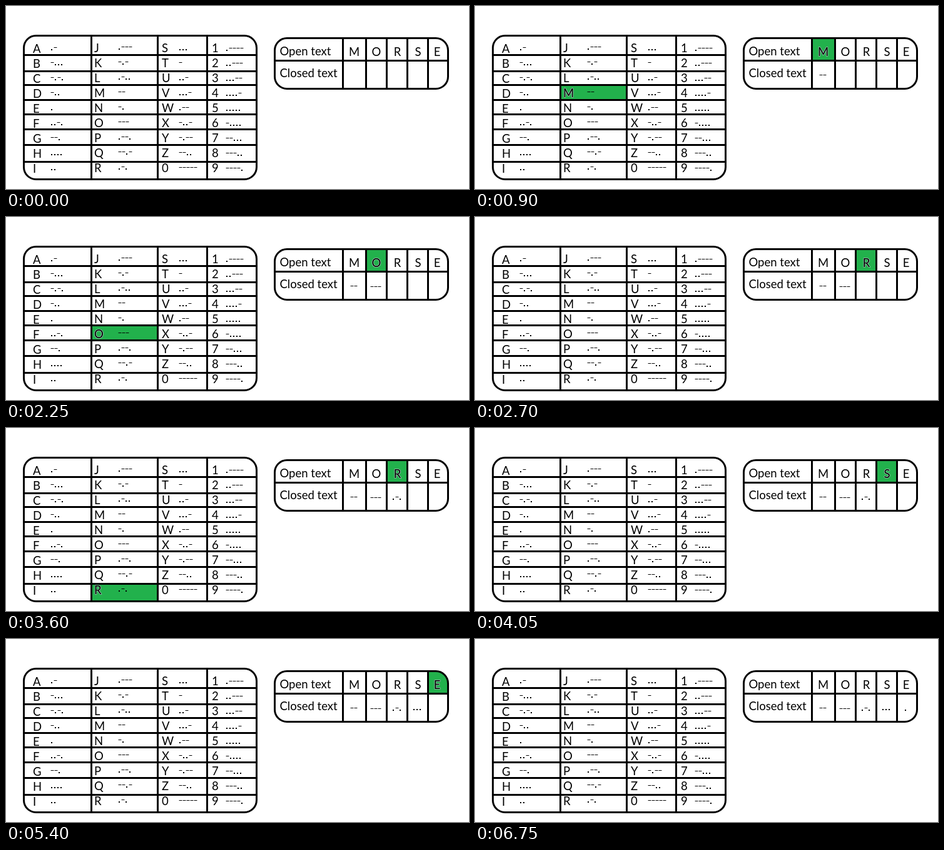
An HTML page with a canvas for the animation above (8100 ms loop, 740 px wide and 293 px high).

```html
<!DOCTYPE html>
<html lang="en">
<head>
<meta charset="utf-8">
<title>Morse encoding</title>
<style>
  html, body { margin: 0; width: 100%; height: 100%; overflow: hidden; background: #fff; }
  canvas { display: block; }
</style>
</head>
<body>
<canvas id="stage" width="740" height="293"></canvas>
<script>
const ctx = document.getElementById('stage').getContext('2d');
const STEP = 450, LOOP = 8100, GREEN = '#22b14c';

const COLUMNS = [
  { chars: 'ABCDEFGHI', x: 43, y: 75, codeX: 71, codeY: 71,
    codes: '.- -... -.-. -.. . ..-. --. .... ..' },
  { chars: 'JKLMNOPQR', x: 141, y: 74, codeX: 179, codeY: 70,
    codes: '.--- -.- .-.. -- -. --- .--. --.- .-.' },
  { chars: 'STUVWXYZ0', x: 249, y: 74, codeX: 276, codeY: 71,
    codes: '... - ..- ...- .-- -..- -.-- --.. -----' },
  { chars: '123456789', x: 329, y: 74, codeX: 351, codeY: 72,
    codes: '.---- ..--- ...-- ....- ..... -.... --... ---.. ----.' }
].map(c => ({ ...c, codes: c.codes.split(' ') }));

// Centres of the ruled lines
const COL_LINES = [28.5, 136.5, 242.5, 321.5, 400.5];
const ROW_LINES = [47.5, 78.5, 104.5, 126.5, 150.5, 173.5, 197.5, 222.5, 249.5, 277.5];
const WORD_LINES = [538.5, 575.5, 608.5, 641.5, 674.5, 706.5];
const WORD_ROWS = [51.5, 87.5, 132.5];
const WORD_LEFT = 429.5;

const WORD = [
  { char: 'M', x: 556.5, codeX: 550, codeY: 115, col: 1, row: 3 },
  { char: 'O', x: 592, codeX: 582, codeY: 116, col: 1, row: 5 },
  { char: 'R', x: 625.5, codeX: 617, codeY: 115, col: 1, row: 8 },
  { char: 'S', x: 658.5, codeX: 650, codeY: 114, col: 2, row: 0 },
  { char: 'E', x: 689, codeX: 686, codeY: 115, col: 0, row: 4 }
];

function framePath(x0, y0, x1, y1) {
  ctx.beginPath();
  ctx.roundRect(x0, y0, x1 - x0, y1 - y0, 19.5);
}

function line(x0, y0, x1, y1) {
  ctx.beginPath();
  ctx.moveTo(x0, y0);
  ctx.lineTo(x1, y1);
  ctx.stroke();
}

function grid(xs, ys, firstX) {
  ctx.strokeStyle = '#000';
  ctx.lineWidth = 3;
  const right = xs[xs.length - 1], bottom = ys[ys.length - 1];
  framePath(firstX, ys[0], right, bottom);
  ctx.stroke();
  for (const x of xs.slice(0, -1)) if (x > firstX) line(x, ys[0], x, bottom);
  for (const y of ys.slice(1, -1)) line(firstX, y, right, y);
}

function fillCell(x0, y0, x1, y1) {
  ctx.fillStyle = GREEN;
  ctx.fillRect(x0, y0, x1 - x0, y1 - y0);
}

function label(text, x, y, align = 'left', halo = false) {
  ctx.textAlign = align;
  if (halo) {
    ctx.strokeStyle = 'rgba(220, 200, 230, 0.65)';
    ctx.lineWidth = 1.7;
    ctx.strokeText(text, x, y);
  }
  ctx.fillStyle = '#000';
  ctx.fillText(text, x, y);
}

function morse(code, x, base) {
  ctx.fillStyle = '#000';
  for (const mark of code) {
    if (mark === '.') {
      ctx.fillRect(x + 1, base - 2, 2, 2);
      x += 5;
    } else {
      ctx.fillRect(x + 0.6, base - 5, 4.8, 1);
      x += 6;
    }
  }
}

function draw(time) {
  // Each letter takes three steps: highlight, look up, write
  const tick = Math.floor((time % LOOP) / STEP);
  const index = tick < 1 || tick > 14 ? -1 : Math.floor(tick / 3);
  const active = WORD[index];
  // The first letter is looked up as soon as it is highlighted
  const found = active && tick % 3 > 0;
  const written = Math.floor((tick + 1) / 3);

  ctx.fillStyle = '#fff';
  ctx.fillRect(0, 0, 740, 293);
  ctx.font = '18.5px Lato, Carlito, sans-serif';
  ctx.lineJoin = 'round';

  if (found) {
    const { col, row } = active;
    fillCell(COL_LINES[col], ROW_LINES[row], COL_LINES[col + 1], ROW_LINES[row + 1]);
  }
  if (active) {
    ctx.save();
    framePath(WORD_LEFT, WORD_ROWS[0], WORD_LINES[5], WORD_ROWS[2]);
    ctx.clip();
    fillCell(WORD_LINES[index], WORD_ROWS[0], WORD_LINES[index + 1], WORD_ROWS[1]);
    ctx.restore();
  }

  grid(COL_LINES, ROW_LINES, COL_LINES[0]);
  grid(WORD_LINES, WORD_ROWS, WORD_LEFT);

  for (const { chars, codes, x, y, codeX, codeY } of COLUMNS) {
    codes.forEach((code, i) => {
      label(chars[i], x, y + 24 * i, 'left', found && active.char === chars[i]);
      morse(code, codeX, codeY + 24 * i);
    });
  }

  label('Open text', 437.5, 79);
  label('Closed text', 437.5, 114);
  WORD.forEach((w, i) => {
    label(w.char, w.x, 80, 'center', i === index);
    if (i < written) morse(COLUMNS[w.col].codes[w.row], w.codeX, w.codeY);
  });
}

const start = performance.now();
function loop() {
  draw(performance.now() - start);
  requestAnimationFrame(loop);
}
loop();
</script>
</body>
</html>
```
